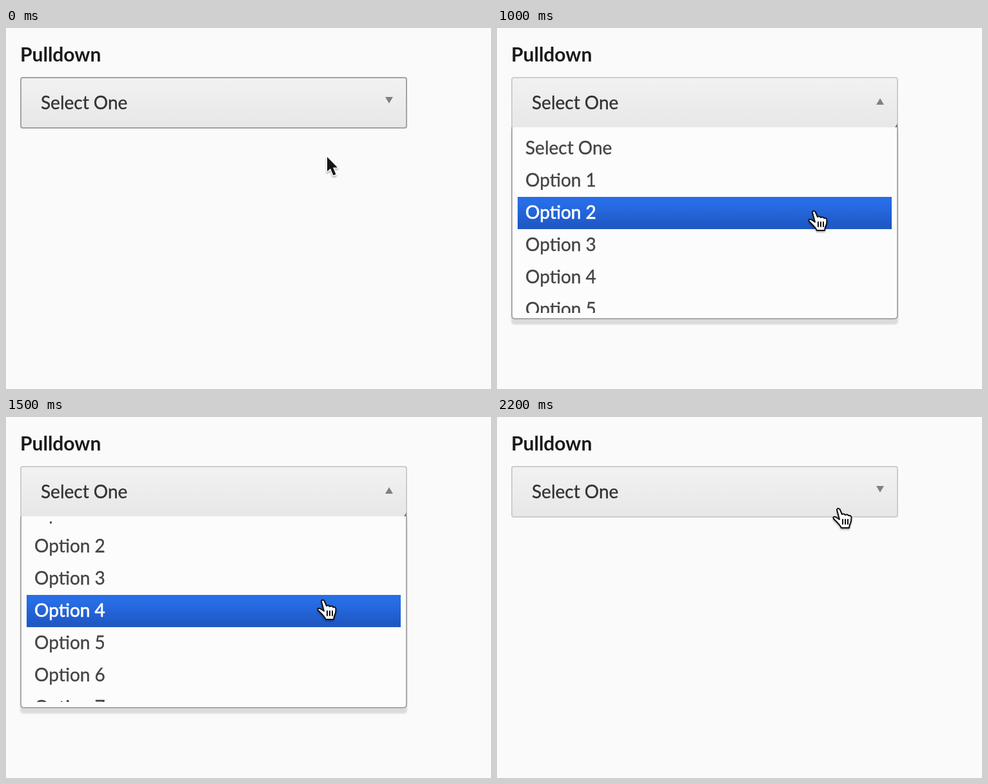
Recreate the animation shown at these times as an HTML page. Size 752 by 560 pixels, loop 2500 ms.

```html
<!DOCTYPE html>
<html lang="en">
<head>
<meta charset="utf-8">
<title>Pulldown</title>
<style>
  html, body { margin: 0; width: 100%; height: 100%; overflow: hidden; background: #fafafa; }
  svg { display: block; width: 752px; height: 560px; }
  text { font: 28px Lato, "Open Sans", sans-serif; fill: #333; stroke: #333; stroke-width: .35px; }
  text.label { font-size: 30px; font-weight: 700; fill: #1a1a1a; stroke: none; }
  text.row { fill: #444; stroke: #444; }
  text.row.on { fill: #fff; stroke: #fff; stroke-width: .7px; }
  #panel { filter: drop-shadow(0 8px 1px rgba(0, 0, 0, .12)); }
  .cursor { filter: drop-shadow(0 2px 1px rgba(0, 0, 0, .3)); }
</style>
</head>
<body>
<svg viewBox="0 0 752 560">
  <defs>
    <linearGradient id="face" x1="0" y1="0" x2="0" y2="1">
      <stop offset="0" stop-color="#f2f2f2"/>
      <stop offset="1" stop-color="#e7e7e7"/>
    </linearGradient>
    <linearGradient id="blue" x1="0" y1="0" x2="0" y2="1">
      <stop offset=".2" stop-color="#276de6"/>
      <stop offset=".9" stop-color="#1f58c5"/>
    </linearGradient>
    <clipPath id="view"><rect x="32" y="162" width="580" height="280"/></clipPath>
  </defs>

  <text class="label" x="22" y="52">Pulldown</text>
  <rect id="box" x="23" y="77" width="598" height="78" rx="3" fill="url(#face)" stroke-width="2"/>
  <text x="54" y="126">Select One</text>
  <path id="mark" fill="#808080"/>

  <g id="menu">
    <path id="panel" d="M22 154H622V446Q622 452 616 452H28Q22 452 22 446Z" fill="#fcfcfc"/>
    <path d="M23 154V446Q23 451 28 451H616Q621 451 621 446V154" fill="none" stroke="#a8a8a8" stroke-width="2"/>
    <path d="M621 148V154H617Z" fill="#777"/>
    <g clip-path="url(#view)">
      <rect id="bar" x="32" width="580" height="50" fill="url(#blue)"/>
      <g id="rows"></g>
    </g>
  </g>

  <g id="arrow" class="cursor">
    <path d="M0 0V22.5L5 18L9.500 28.500L13.500 27L9 16.500H16Z" fill="#151515"
      stroke="#fff" stroke-width="3" stroke-linejoin="round" paint-order="stroke"/>
  </g>
  <g id="hand" class="cursor" stroke="#111" stroke-width="2" stroke-linecap="round" stroke-linejoin="round">
    <path d="M7 4Q8 0 11.500 3L15 11Q17.500 9 20 12Q23 10 25 13Q29 12 29.500 16L29 22Q26.500 27 26 32H14Q12 28 8 24L2 18Q0 14 5 15L11 19Z" fill="#fff"/>
    <path d="M16 19V26M20 19V26M24 19V26" fill="none"/>
  </g>
</svg>
<script>
  const LOOP = 2500, STEP = 100, TOP = 162, ROW = 50;
  const OPEN = 700, CLOSE = 2100, HOVER = 200, HAND = 500;

  // time, cursor x, cursor y, list scroll
  const steps = [
    [0, 498, 200, 0], [100, 504, 185, 0], [200, 526, 142, 0], [300, 548, 103, 0],
    [400, 556, 88, 0], [500, 550, 100, 0], [600, 546, 113, 0], [700, 544, 120, 0],
    [900, 508, 222, 0], [1000, 482, 282, 0], [1100, 482, 282, 14], [1200, 482, 282, 64],
    [1300, 482, 282, 114], [1400, 482, 282, 123], [1500, 482, 282, 86],
    [1600, 482, 282, 34], [1700, 482, 282, 6], [1800, 503, 207, 0], [1900, 520, 140, 0]
  ];

  const $ = id => document.getElementById(id);
  const set = (id, name, value) => $(id).setAttribute(name, value);
  const show = (id, on) => set(id, "visibility", on ? "visible" : "hidden");

  const names = ["Select One", ...Array.from({ length: 8 }, (_, i) => "Option " + (i + 1))];
  const rows = names.map((name, i) => {
    const row = document.createElementNS("http://www.w3.org/2000/svg", "text");
    row.setAttribute("x", 44);
    row.setAttribute("y", TOP + i * ROW + 34);
    row.textContent = name;
    $("rows").append(row);
    return row;
  });

  function draw(time) {
    const t = Math.floor(time % LOOP / STEP) * STEP;
    const [, x, y, scroll] = steps.filter(s => s[0] <= t).pop();
    const open = t >= OPEN && t < CLOSE;
    const pick = Math.max(0, Math.floor((y + 1 - TOP + scroll) / ROW));

    set("box", "stroke", t < HOVER ? "#a3a3a3" : "#cdcdcd");
    set("mark", "d", open ? "M588 119H600L594 109Z" : "M588 107H600L594 117Z");
    set("menu", "display", open ? "inline" : "none");
    set("rows", "transform", `translate(0 ${-scroll})`);
    set("bar", "y", TOP + pick * ROW - scroll);
    rows.forEach((row, i) => row.setAttribute("class", i === pick ? "row on" : "row"));

    show("arrow", t < HAND);
    show("hand", t >= HAND);
    set(t < HAND ? "arrow" : "hand", "transform", `translate(${x} ${y})`);
  }

  const start = performance.now();
  function tick() {
    draw(performance.now() - start);
    requestAnimationFrame(tick);
  }
  tick();
</script>
</body>
</html>
```
